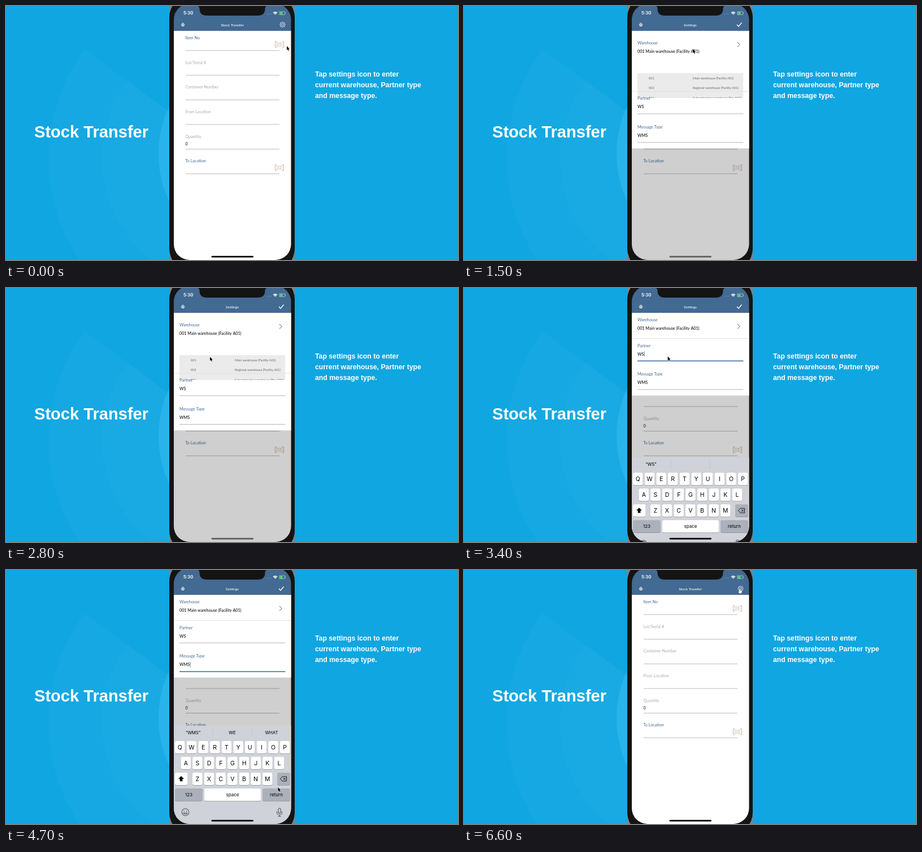
Animation, 800 px wide and 450 px high, one loop 6900 ms. Source, as an HTML page with a canvas:

```html
<!DOCTYPE html>
<html lang="en">
<head>
<meta charset="utf-8">
<title>Stock Transfer</title>
<style>
html, body { margin: 0; width: 100%; height: 100%; overflow: hidden; background: #10a6e1; }
canvas { display: block; width: 800px; height: 450px; }
</style>
</head>
<body>
<canvas id="stage"></canvas>
<script>
const LOOP = 6900, STEP = 100;
const BLUE = '#3f6a94', GREY = '#aaaaaa', INK = '#111';
const LATO = 'Lato, sans-serif', UI = 'Inter, sans-serif', SANS = '"Liberation Sans", Arial, sans-serif';

const canvas = document.getElementById('stage');
const ratio = window.devicePixelRatio || 1;
canvas.width = 800 * ratio;
canvas.height = 450 * ratio;
const ctx = canvas.getContext('2d');
ctx.scale(ratio, ratio);
ctx.textBaseline = 'alphabetic';

// Keys are [time, value, value, ...]; eased between neighbours, held outside.
function track(t, keys) {
  let i = keys.findIndex(k => k[0] > t);
  if (i < 0) i = keys.length;
  if (i === 0 || i === keys.length) return keys[Math.max(0, i - 1)].slice(1);
  const a = keys[i - 1], b = keys[i];
  const u = (t - a[0]) / (b[0] - a[0]), e = u * u * (3 - 2 * u);
  return a.slice(1).map((v, j) => v + (b[j + 1] - v) * e);
}
const settle = (t, start) => t < start ? 1 : Math.exp(-0.0097 * (t - start));

const CURSOR = [
  [0, 497, 71], [500, 489, 33], [700, 489, 33], [900, 429.5, 63], [1200, 405, 76],
  [1900, 405, 76], [2100, 371, 123], [2600, 361, 122], [3700, 360.5, 121],
  [4100, 349, 166], [4400, 349, 166], [4700, 481.5, 385], [4900, 481.5, 385],
  [5400, 475.5, 388], [5600, 475.5, 388], [6100, 488, 33]
];
const SCROLL = [[1900, 0], [2100, 22], [2300, 20], [2600, 0]];
const EXPAND = [[1400, 0], [1600, 1], [2700, 1], [2900, 0]];

function text(str, x, y, size, color, family = LATO, weight = 400, align = 'left') {
  ctx.font = `${weight} ${size}px ${family}`;
  ctx.fillStyle = color;
  ctx.textAlign = align;
  ctx.fillText(str, x, y);
}
function rect(x, y, w, h, color, r = 0) {
  ctx.fillStyle = color;
  ctx.beginPath();
  ctx.roundRect(x, y, w, h, r);
  ctx.fill();
}
function line(points, color, width = 1) {
  ctx.strokeStyle = color;
  ctx.lineWidth = width;
  ctx.beginPath();
  points.forEach(([x, y]) => ctx.lineTo(x, y));
  ctx.stroke();
}
function circle(x, y, r, color, width) {
  ctx.beginPath();
  ctx.arc(x, y, r, 0, 7);
  ctx.lineWidth = width || 0;
  ctx.fillStyle = ctx.strokeStyle = color;
  width ? ctx.stroke() : ctx.fill();
}
function layer(draw) {
  ctx.save();
  draw();
  ctx.restore();
}
function clip(x, y, w, h, r = 0) {
  ctx.beginPath();
  ctx.roundRect(x, y, w, h, r);
  ctx.clip();
}

function drawBackdrop() {
  rect(0, 0, 800, 450, '#10a6e1');
  layer(() => {
    clip(0, 0, 400, 450);
    ctx.fillStyle = 'rgba(255,255,255,.018)';
    for (const r of [325, 230]) {
      ctx.beginPath();
      ctx.moveTo(400, 270);
      ctx.arc(400, 270, r, 1.75, 3.78);
      ctx.fill();
    }
    circle(470, 262, 200, 'rgba(80,205,255,.25)');
  });
  text('Stock Transfer', 50, 233, 29.1, '#fff', SANS, 700);
  ['Tap settings icon to enter', 'current warehouse, Partner type', 'and message type.']
    .forEach((s, i) => text(s, 547, 125 + i * 19, 12.25, '#fff', SANS, 700));
}

function drawScanIcon(x, y) {
  const tan = '#c6b59d';
  for (const s of [-1, 1])
    line([[x + s * 4.5, y - 5], [x + s * 7.5, y - 5], [x + s * 7.5, y + 5], [x + s * 4.5, y + 5]], tan, 1);
  for (let i = 0; i < 4; i++) {
    const cx = x - 4.2 + i * 2.8;
    rect(cx - .6, y - 3.4, 1.2, i % 2 ? 1.8 : 2.8, tan);
    rect(cx - .6, y + (i % 2 ? -.8 : .4), 1.2, 1.6, tan);
    rect(cx - .6, y + 2, 1.2, 1.6, tan);
  }
}

function drawForm() {
  rect(297, 44, 208, 406, '#fff');
  ['Item No', 'Lot/Serial #', 'Container Number', 'From Location', 'Quantity', 'To Location'].forEach((label, i) => {
    const y = 59 + i * 43.65, main = i % 5 === 0;
    text(label, 317.5, y, 7.2, main ? BLUE : GREY);
    line([[318, y + 20], [484, y + 20]], '#b4b4b4', .9);
    if (main) drawScanIcon(484, y + 9.2);
  });
  text('0', 317.5, 247.4, 7.2, INK);
}

function drawField(label, value, y, focused) {
  text(label, 307, y, 7.2, BLUE);
  text(value, 307, y + 15.2, 7.2, INK, LATO, 500);
  line([[307, y + 24.7], [494.5, y + 24.7]], focused ? '#3a699b' : '#adadad', focused ? 1.5 : .9);
  if (focused) {
    ctx.font = `500 7.2px ${LATO}`;
    rect(307.5 + ctx.measureText(value).width, y + 8, .9, 9, '#3a73c4');
  }
}

function drawSettings(t, offset) {
  const open = track(t, EXPAND)[0], grow = 123.3 * open, shift = 17.4 * open;
  layer(() => {
    clip(297, 44, 208, 406);
    ctx.translate(0, offset);
    rect(297, 44, 208, 406, 'rgba(0,0,0,.19)');
    rect(297, 44, 208, 146.5 + grow, '#fff');
    text('Warehouse', 307, 59 + shift, 7.2, BLUE);
    text('001 Main warehouse (Facility A01)', 307, 74.2 + shift, 7.2, INK, LATO, 500);
    if (open > .5) line([[483, 84.5], [486, 87.5], [489, 84.5]], '#c4c4c4', .8);
    else line([[484, 64], [488, 68.2], [484, 72.4]], '#555', 1);
    if (open) drawList(track(t, SCROLL)[0], open);
    line([[297, 89.5 + grow], [505, 89.5 + grow]], '#dedede', .8);
    drawField('Partner', 'WS', 104.5 + grow, t >= 3100 && t < 4000);
    drawField('Message Type', 'WMS', 155.2 + grow, t >= 4000 && t < 4900);
  });
}

function drawList(scroll, open) {
  const rows = [
    ['001', 'Main warehouse (Facility A01)'], ['002', 'Regional warehouse (Facility A01)'],
    ['101', 'Subcontractor warehouse (Fac A01)'], ['901', 'Main warehouse (Facility B01)'],
    ['Z/N', 'Installation wareh (Facility A01)']
  ];
  layer(() => {
    clip(307, 119, 187.5, 88 * open);
    rect(307, 119 - scroll, 187.5, 87.5, '#ebebeb');
    rows.forEach(([code, name], i) => {
      const y = 129.6 - scroll + i * 17.5;
      text(code, 327, y, 5.5, '#666');
      text(name, 405, y, 5.5, '#666');
    });
  });
}

function drawKey(x, y, w, label, color = '#fff', size = 10.5) {
  rect(x, y - 10.2, w, 22, '#8e9197', 3);
  rect(x, y - 11, w, 22, color, 3);
  text(label, x + w / 2, y + size * .36, size, '#000', UI, 400, 'center');
}

function drawKeyboard(t, offset) {
  const dark = '#abb0bb';
  const words = t < 4200 ? ['“WS”', '', ''] : ['“WMS”', 'WE', 'WHAT'];
  layer(() => {
    ctx.translate(0, offset);
    rect(297, 276, 208, 180, '#cfd2d8');
    words.forEach((w, i) => text(w, 331 + i * 69.5, 291.2, 7.8, '#000', UI, 400, 'center'));
    for (const x of [366, 435]) line([[x, 282], [x, 295]], '#bcc0c6', .7);
    [['QWERTYUIOP', 299], ['ASDFGHJKL', 309.5], ['ZXCVBNM', 330]].forEach(([keys, x], row) =>
      [...keys].forEach((k, i) => drawKey(x + i * 20.65, 314 + row * 28, 17.6, k)));
    drawKey(299, 370, 22.5, '');
    drawKey(480, 370, 23, '', dark);
    drawKey(299, 398, 49, '123', dark, 8);
    drawKey(351, 398, 100, 'space', '#fff', 8);
    drawKey(454, 398, 49, 'return', dark, 8);
    ctx.fillStyle = '#000';
    ctx.fill(new Path2D('M310 365l5 5h-2.7v4.3h-4.6V370H305z'));
    ctx.strokeStyle = '#111';
    ctx.lineWidth = .9;
    ctx.stroke(new Path2D('M485.5 370l3.5-4h7.5v8H489zM490.8 368l4 4m0-4l-4 4'));
    circle(317.5, 429, 6.3, '#50545b', 1.1);
    circle(315.3, 427.3, .9, '#50545b');
    circle(319.7, 427.3, .9, '#50545b');
    ctx.strokeStyle = '#50545b';
    ctx.stroke(new Path2D('M314 430.5q3.5 4.5 7 0zM482 424a2 2 0 0 1 4 0v5a2 2 0 0 1-4 0zM479.5 427.5v2a4.5 4.5 0 0 0 9 0v-2M484 434v2.5m-2.5 0h5'));
  });
}

function drawGear(x, y) {
  ctx.strokeStyle = '#fff';
  ctx.lineWidth = .9;
  ctx.beginPath();
  for (let i = 0; i <= 48; i++) {
    const a = i / 48 * Math.PI * 2, r = 4.2 + .6 * Math.cos(a * 8);
    ctx.lineTo(x + r * Math.cos(a), y + r * Math.sin(a));
  }
  ctx.stroke();
  circle(x, y, 1.9, '#fff', .8);
}

function drawHeader(settings) {
  rect(297, -4, 208, 48, '#426a92');
  text('5:30', 314, 15.3, 7.9, '#fff', UI, 600);
  for (let i = 0; i < 4; i++) circle(461.5 + i * 2.5, 14.5, .5, 'rgba(255,255,255,.5)');
  for (const r of [1.6, 3.4, 5.2]) {
    ctx.strokeStyle = '#fff';
    ctx.lineWidth = 1.3;
    ctx.beginPath();
    ctx.arc(476.5, 15.8, r, -2.35, -.79);
    ctx.stroke();
  }
  ctx.strokeStyle = 'rgba(255,255,255,.65)';
  ctx.lineWidth = .7;
  ctx.strokeRect(484, 10, 9.5, 5.5);
  rect(484.8, 10.8, 4.8, 3.9, '#4cdb64');
  rect(494.3, 11.8, .8, 2, 'rgba(255,255,255,.65)');
  [4, 6.4, 6.4, 4].forEach((w, i) => rect(313 - w / 2, 30.3 + i * 1.6, w, .9, '#fff'));
  text(settings ? 'Settings' : 'Stock Transfer', 400.5, 36.2, 6.5, '#fff', LATO, 500, 'center');
  if (settings) line([[483, 33], [486, 36.2], [491.5, 29.5]], '#fff', 1.4);
  else drawGear(489.5, 33);
}

function drawCursor(x, y) {
  const hand = y < 36;
  const shape = new Path2D(hand
    ? 'M-.8 .5q.8-1 1.6 0V3l2.4.6q.9.5.7 1.8L3 8.5H-.7L-2.8 5.4q.6-1 2 .1z'
    : 'M0 0V7.2L1.7 5.7 2.9 8.4 4.1 7.9 2.9 5.2H5z');
  layer(() => {
    ctx.translate(x, y);
    ctx.lineJoin = 'round';
    ctx.lineWidth = hand ? .8 : 1.2;
    ctx.strokeStyle = hand ? '#222' : 'rgba(255,255,255,.85)';
    ctx.fillStyle = hand ? '#fff' : '#000';
    ctx.stroke(shape);
    ctx.fill(shape);
  });
}

function drawPhone(t) {
  rect(289, 0, 222, 450, '#7d8288');
  rect(289, -18, 222, 486, '#141414', 38);
  const panel = t < 6400 ? 406 * settle(t, 650) : track(t, [[6300, 0], [6600, 406]])[0];
  const keyboard = 174 * (t < 4900 ? settle(t, 3197) : 1 - settle(t, 4850));
  layer(() => {
    clip(297, -4, 207.5, 454, 28);
    drawForm();
    if (t >= 700 && t < 6600) drawSettings(t, panel);
    if (t >= 3200 && t < 5500) drawKeyboard(t, keyboard);
    drawHeader(t >= 700 && t < 6500);
    rect(363.5, 442.8, 74.5, 2.6, t >= 800 && t < 3200 ? '#5c5c5c' : '#000', 1.3);
  });
  ctx.fillStyle = '#141414';
  ctx.fill(new Path2D('M338 0q4.5 0 4.5 4.5q0 12.5 13 12.5h90q13 0 13-12.5q0-4.5 4.5-4.5z'));
  drawCursor(...track(t, CURSOR));
}

function frame(now) {
  const t = Math.floor(now % LOOP / STEP) * STEP;
  drawBackdrop();
  drawPhone(t);
  requestAnimationFrame(frame);
}
requestAnimationFrame(frame);
</script>
</body>
</html>
```
